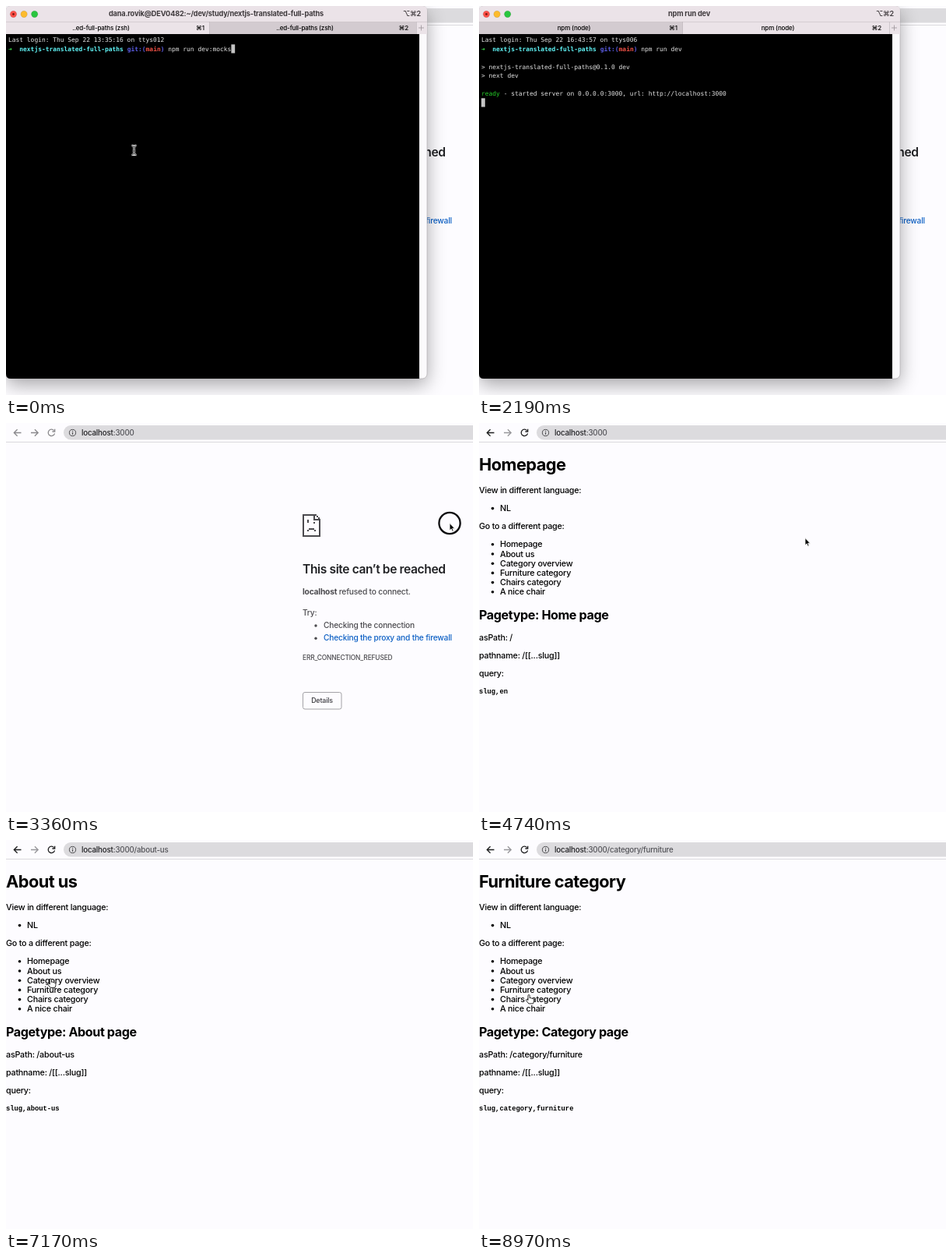
These frames come from a looping animation (600 px wide and 499 px high, 9 s). An HTML page:

```html
<!DOCTYPE html>
<html lang="en">
<head>
<meta charset="utf-8">
<title>Translated paths demo</title>
<style>
  html, body { margin: 0; width: 100%; height: 100%; overflow: hidden; background: #fdfcff; }
  svg { display: block; width: 600px; height: 499px; }
  text { white-space: pre; }
  .ui { font-family: Inter, "DejaVu Sans", sans-serif; letter-spacing: -.02em; }
  .mono { font-family: "DejaVu Sans Mono", monospace; font-size: 7.93px; }
  .code { font-family: "Liberation Mono", monospace; font-size: 8.81px; font-weight: 700; }
</style>
</head>
<body>
<svg id="stage" viewBox="0 0 600 499">
  <defs>
    <filter id="shade" x="-20%" y="-20%" width="140%" height="140%">
      <feGaussianBlur stdDeviation="12"/>
    </filter>
  </defs>
</svg>
<script>
const LOOP = 9000, ENTER1 = 360, MOCKS = 540, SWITCH = 810, TYPE = 870, ENTER2 = 1470,
      BANNER = 1740, READY = 2100, FRONT = 3330, LOADED = 4440;
const stage = document.getElementById('stage');
const timed = [];

function add(parent, tag, attrs, content) {
  const el = document.createElementNS('http://www.w3.org/2000/svg', tag);
  for (const k in attrs) el.setAttribute(k, attrs[k]);
  if (content) el.textContent = content;
  parent.append(el);
  return el;
}
const group = (parent, attrs) => add(parent, 'g', attrs || {});
const rect = (parent, x, y, width, height, fill, more) =>
  add(parent, 'rect', { x, y, width, height, fill, ...more });
const dot = (parent, cx, cy, r, fill, more) => add(parent, 'circle', { cx, cy, r, fill, ...more });
const path = (parent, d, more) => add(parent, 'path', { d, fill: 'none', ...more });
const label = (parent, x, y, size, str, more) =>
  add(parent, 'text', { class: 'ui', x, y, 'font-size': size, fill: '#000', ...more }, str);
function during(el, from, to = LOOP) {
  timed.push([el, from, to]);
  return el;
}

/* Browser */
const browser = group(stage, { 'font-weight': 450 });
rect(browser, 0, 0, 600, 499, '#fdfcff');
rect(browser, 0, 24, 600, 1, '#dad9dc');
rect(browser, 74, 3, 560, 18.5, '#dcdbde', { rx: 9.25 });

const ICONS = [
  'M19.5 12.5H10.5M14.6 8.2L10.3 12.5L14.6 16.8',
  'M32 12.5H41M36.9 8.2L41.2 12.5L36.9 16.8',
  'M61.6 9.6A4.2 4.2 0 1 0 62.5 13.4M62.7 7.8V11H59.4'
];
function icons(colors, from, to) {
  const g = during(group(browser, { 'stroke-width': 1.3 }), from, to);
  ICONS.forEach((d, i) => path(g, d, { stroke: colors[i] }));
}
icons(['#8a898d', '#8a898d', '#8a898d'], 0, 3420);
icons(['#1d1d1f', '#98979b', '#1d1d1f'], 3420);

dot(browser, 85.5, 12.5, 4.1, 'none', { stroke: '#4a4a4d', 'stroke-width': 1 });
rect(browser, 85, 12, 1.1, 2.8, '#4a4a4d');
rect(browser, 85, 10, 1.1, 1.1, '#4a4a4d');
const url = label(browser, 97, 16, 9.75, '');
add(url, 'tspan', { fill: '#1f1f22' }, 'localhost');
const tail = add(url, 'tspan', { fill: '#535358' }, ':3000');

/* Connection error */
const error = during(group(browser), 0, LOADED);
const INK = '#4b4a4e';
path(error, 'M399 118H382V145H403V124M396 117V124H404', { stroke: INK, 'stroke-width': 2 });
for (const [x, y, w, h] of [[399, 119, 2, 2], [401, 121, 2, 2], [387, 124, 2, 4], [395, 127, 2, 2],
  [389, 135, 7, 2], [387, 137, 2, 2], [396, 137, 2, 2]]) rect(error, x, y, w, h, INK);
label(error, 381, 193.3, 15.6, 'This site can’t be reached',
  { 'font-weight': 600, fill: '#202124', style: 'letter-spacing:-.025em' });
const refused = label(error, 381, 220.3, 10.25, '', { fill: INK });
add(refused, 'tspan', { 'font-weight': 700 }, 'localhost');
add(refused, 'tspan', {}, ' refused to connect.');
label(error, 381, 247, 10.2, 'Try:', { fill: INK });
dot(error, 398, 260, 1.7, INK);
label(error, 408, 263.2, 10.2, 'Checking the connection', { fill: INK });
dot(error, 398, 276.2, 1.7, INK);
label(error, 408, 279.4, 10.2, 'Checking the proxy and the firewall', { fill: '#0c5fc4' });
label(error, 381, 304.4, 8.42, 'ERR_CONNECTION_REFUSED', { fill: INK });
rect(error, 381.5, 345.5, 49.5, 21.5, 'none', { rx: 2.5, stroke: '#a3a2a6' });
label(error, 406, 359.3, 8.9, 'Details', { fill: '#3c3c40', 'text-anchor': 'middle' });

/* Site pages */
const site = during(group(browser), LOADED);
const BODY = 10.74;
const line = (x, y, str) => label(site, x, y, BODY, str);
const item = (str, y) => {
  dot(site, 17.5, y - 3.6, 1.8, '#000');
  line(27, y, str);
};
const bold = { 'font-weight': 700, style: 'letter-spacing:-.025em' };
const h1 = label(site, 0, 60.5, 21.8, '', bold);
line(0, 90.2, 'View in different language:');
item('NL', 113.2);
line(0, 136.3, 'Go to a different page:');
['Homepage', 'About us', 'Category overview', 'Furniture category', 'Chairs category', 'A nice chair']
  .forEach((str, i) => item(str, 159.4 + i * 12.2));
const h2 = label(site, 0, 251.8, 16.15, '', bold);
const asPath = line(0, 279, '');
line(0, 302.2, 'pathname: /[[...slug]]');
line(0, 325.4, 'query:');
const query = add(site, 'text', { class: 'code', x: 0, y: 346.6 });

const PAGES = [
  [LOADED, 'Homepage', 'Home', '/', 'en'],
  [7020, 'About us', 'About', '/about-us', 'about-us'],
  [7740, 'Category overview', 'Category overview', '/category', 'category'],
  [8340, 'Furniture category', 'Category', '/category/furniture', 'category,furniture']
];

/* Terminal */
const term = during(group(stage), 0, FRONT);
rect(term, 0, 8, 541, 478, '#000', { rx: 8, opacity: .34, filter: 'url(#shade)' });
rect(term, 0, 0, 541, 478, '#fbfafc', { rx: 6, stroke: '#a9a5a8', 'stroke-width': .6 });
path(term, 'M0 36V6Q0 0 6 0H535Q541 0 541 6V36Z', { fill: '#ebe3e8' });
path(term, 'M0 36H531V478H6Q0 478 0 472Z', { fill: '#000' });
['#fe5048', '#fdbb2d', '#29c63f'].forEach((c, i) =>
  dot(term, 9.5 + i * 13.6, 10.5, 4.2, c, { stroke: '#0003', 'stroke-width': .5 }));
dot(term, 9.5, 10.5, 1.4, '#7d1712');

const title = label(term, 270, 13.4, 9.2, '',
  { 'font-weight': 700, 'text-anchor': 'middle', fill: '#3f3a3d' });
label(term, 533, 13, 9, '⌥⌘2', { 'font-weight': 600, 'text-anchor': 'end', fill: '#3f3a3d' });
during(rect(term, 262, 20.5, 265, 15.5, '#d3cbd0'), 0, SWITCH);
during(rect(term, 0, 20.5, 261, 15.5, '#d3cbd0'), SWITCH);
rect(term, 0, 20, 541, .6, '#c6bec3');
rect(term, 261, 20, .8, 16, '#bfb7bc');
rect(term, 527, 20, .8, 16, '#c6bec3');
path(term, 'M530 28H537M533.5 24.5V31.5', { stroke: '#9b9398', 'stroke-width': .8 });
const tab = (x, key) => {
  label(term, x + 133, 31, 8, key, { 'text-anchor': 'end', 'font-weight': 500 });
  return label(term, x, 30.9, 8, '', { 'text-anchor': 'middle', 'font-weight': 450 });
};
const tab1 = tab(122, '⌘1'), tab2 = tab(384, '⌘2');

const CELL = 4.773, ROW = 11.5;
const write = (parent, row, col, str, fill = '#e4e4e4', weight = 400) =>
  add(parent, 'text', { class: 'mono', x: 3 + col * CELL, y: 46.3 + row * ROW, fill, 'font-weight': weight }, str);
const REPO = 'nextjs-translated-full-paths';
function shell(from, to, login) {
  const g = during(group(term), from, to);
  write(g, 0, 0, 'Last login: Thu Sep 22 ' + login);
  write(g, 1, 0, '➜', '#3be04a', 700);
  write(g, 1, 3, REPO, '#5ff2f4', 700);
  write(g, 1, 32, 'git:(', '#5a5be0', 700);
  write(g, 1, 37, 'main', '#ef5146', 700);
  write(g, 1, 41, ')', '#5a5be0', 700);
  return g;
}
const shell1 = shell(0, SWITCH, '13:35:16 on ttys012');
write(shell1, 1, 43, 'npm run dev:mocks');
const banner1 = during(group(shell1), MOCKS, SWITCH);
write(banner1, 3, 0, `> ${REPO}@0.1.0 dev:mocks`);

const COMMAND = 'npm run dev';
const shell2 = shell(SWITCH, FRONT, '16:43:57 on ttys006');
const typed = write(shell2, 1, 43, '');
const banner2 = during(group(shell2), BANNER, FRONT);
write(banner2, 3, 0, `> ${REPO}@0.1.0 dev`);
write(banner2, 4, 0, '> next dev');
const ready = during(group(shell2), READY, FRONT);
write(ready, 6, 0, 'ready', '#25d029');
write(ready, 6, 6, '- started server on 0.0.0.0:3000, url: http://localhost:3000');
const block = rect(term, 0, 0, 4.8, 11.2, '#c4c4c4');

/* Pointer: each move runs along a Bezier curve from the last stop */
const pointer = group(stage);
const ring = dot(pointer, 0, .5, 13.6, 'none', { stroke: '#0b0b0d', 'stroke-width': 2.3 });
const beamShape = 'M-3-6Q0-6 0-4Q0-6 3-6M0-4.5V4.5M-3 6Q0 6 0 4Q0 6 3 6M-1.6 1H1.6';
const beam = group(pointer);
path(beam, beamShape, { stroke: '#fff', 'stroke-width': 2.4 });
path(beam, beamShape, { stroke: '#222', 'stroke-width': .9 });
const arrow = path(pointer, 'M0 .6V9.8L2.1 7.8L3.6 11.2L5.1 10.6L3.7 7.2H6.5Z',
  { fill: '#000', stroke: '#fff', 'stroke-width': .8 });
const hand = path(pointer,
  'M-1.2 1.2C-1.2-.4 1-.4 1 1.2V4.4C1.4 3.6 3 3.8 3 4.8C3.6 4.2 4.8 4.4 4.8 5.4' +
  'C5.6 4.9 6.4 5.4 6.4 6.4V8.4L5.4 11.4H-.4L-3.6 7.4C-4.4 6-2.8 5.4-1.2 7Z',
  { fill: '#fff', stroke: '#111', 'stroke-width': .9 });

const START = [164.5, 185];
const MOVES = [
  [2430, 3300, [250, 206], [450, 190], [570, 128]],
  [3420, 4740, [540, 128], [470, 150], [419, 147]],
  [5130, 6000, [330, 120], [150, 200], [10, 215], [46, 156]],
  [6180, 6270, [52, 172]],
  [6510, 6630, [53, 171.5]],
  [7050, 7170, [57.5, 178]],
  [7170, 7290, [58.5, 180]],
  [7890, 8130, [62, 192]],
  [8595, 8610, [63, 192]],
  [8925, 8970, [64.2, 198.5]]
];
const CLICKS = [[3330, 3480], [6960, 7050], [7650, 7740], [8250, 8340]];

const clamp = v => Math.max(0, Math.min(1, v));
const ease = v => v * v * (3 - 2 * v);
function bezier(pts, k) {
  while (pts.length > 1)
    pts = pts.slice(1).map(([x, y], i) => [pts[i][0] + (x - pts[i][0]) * k, pts[i][1] + (y - pts[i][1]) * k]);
  return pts[0];
}
function place(t) {
  let at = START;
  for (const [from, to, ...pts] of MOVES) {
    if (t < from) break;
    at = bezier([at, ...pts], ease(clamp((t - from) / (to - from))));
  }
  return at;
}
const show = (el, on) => { el.style.display = on ? '' : 'none'; };
const put = (el, str) => { if (el.textContent !== str) el.textContent = str; };

function draw(t) {
  for (const [el, from, to] of timed) show(el, t >= from && t < to);

  const zsh = '..ed-full-paths (zsh)', node = 'npm (node)';
  put(tab1, t < ENTER1 ? zsh : node);
  put(tab2, t < ENTER2 ? zsh : node);
  const idle = t < ENTER1 || (t >= SWITCH && t < ENTER2);
  put(title, idle ? `dana.rovik@DEV0482:~/dev/study/${REPO}`
    : t < SWITCH ? 'npm run dev:mocks' : COMMAND);

  const count = Math.floor(clamp((t - TYPE) / 300) * COMMAND.length);
  put(typed, COMMAND.slice(0, count));
  const [col, row] = t < ENTER1 ? [60, 1] : t < MOCKS ? [0, 2] : t < SWITCH ? [0, 4]
    : t < ENTER2 ? [43 + count, 1] : t < BANNER ? [0, 2] : t < READY ? [0, 6] : [0, 7];
  block.setAttribute('x', 3 + col * CELL);
  block.setAttribute('y', 37.8 + row * ROW);

  const page = PAGES.filter(p => t >= p[0]).pop();
  put(tail, ':3000' + (page && page[3] !== '/' ? page[3] : ''));
  if (page) {
    put(h1, page[1]);
    put(h2, `Pagetype: ${page[2]} page`);
    put(asPath, 'asPath: ' + page[3]);
    put(query, 'slug,' + page[4]);
  }

  const [x, y] = place(t);
  pointer.setAttribute('transform', `translate(${x} ${y})`);
  show(pointer, t < ENTER1 || t >= 2430);
  const onText = t < FRONT && x < 531;
  const onLink = t >= LOADED && x > 27 && x < 100 && y > 149 && y < 222;
  show(beam, onText);
  show(hand, onLink);
  show(arrow, !onText && !onLink);
  show(ring, CLICKS.some(([from, to]) => t >= from && t < to));
}

const begin = performance.now();
function tick() {
  draw((performance.now() - begin) % LOOP);
  requestAnimationFrame(tick);
}
tick();
</script>
</body>
</html>
```
